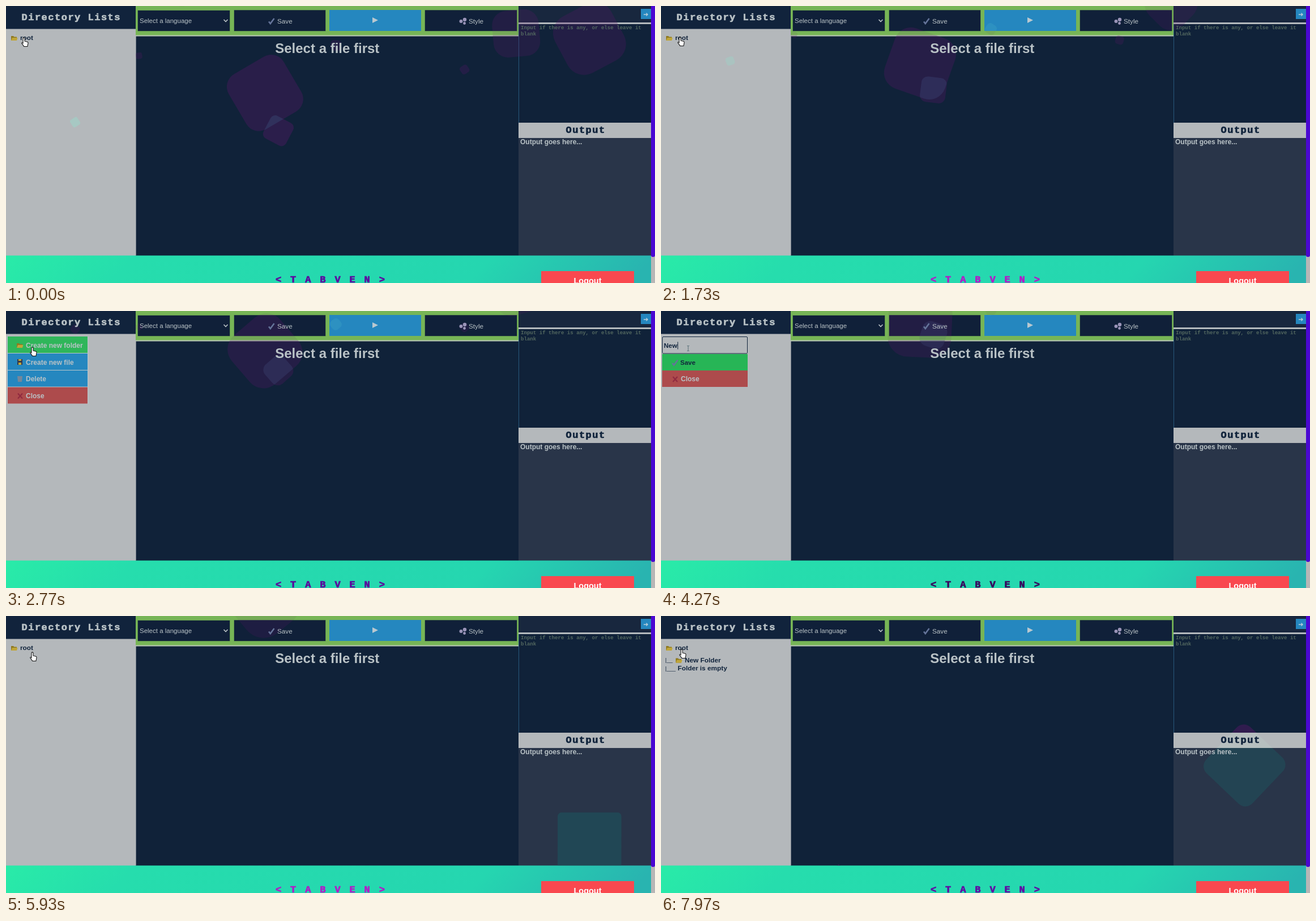
Write an HTML page with a canvas that moves like this. It is 1146 px wide and 489 px high and loops after 8000 ms.

```html
<!DOCTYPE html>
<html lang="en">
<head>
<meta charset="utf-8">
<title>Code editor</title>
<style>
html, body { margin: 0; width: 100%; height: 100%; overflow: hidden; background: #25dbb0; }
svg, canvas { position: absolute; left: 0; top: 0; width: 1146px; height: 489px; }
text { font-family: "Liberation Sans", Arial, sans-serif; font-size: 11.7px; fill: #b9c2c6; white-space: pre; }
.b { font-weight: bold; }
.menu text { font-weight: bold; font-size: 12px; }
.pixel { font: bold 17px "Liberation Mono", monospace; letter-spacing: 1.5px; color: #b9c2c6; fill: currentColor; stroke: currentColor; stroke-width: .7; }
.brand { letter-spacing: 15.9px; }
.mono { font: bold 9.1px "Liberation Mono", monospace; fill: #52675f; }
.dark { color: #11243c; fill: #11243c; }
.tree { font-weight: bold; font-size: 11.8px; fill: #11243c; }
.branch { font-size: 9.5px; fill: #11243c; }
</style>
</head>
<body>

<svg viewBox="0 0 1146 489">
  <defs>
    <linearGradient id="sea" x2="1" y2=".04">
      <stop offset="0" stop-color="#29eba8"/>
      <stop offset=".2" stop-color="#26ddad"/>
      <stop offset=".75" stop-color="#25d6b0"/>
      <stop offset="1" stop-color="#29b4b0"/>
    </linearGradient>
  </defs>
  <rect y="440" width="1146" height="49" fill="url(#sea)"/>
  <rect x="229" width="676" height="440.5" fill="#102239"/>
  <rect width="229.6" height="440.5" fill="#b4b8bb"/>
  <rect width="229" height="40.5" fill="#11233c"/>
  <rect x="229" width="676" height="52" fill="#77b556"/>
  <rect x="229" y="51.5" width="676" height="2" fill="#b9c8b4"/>
  <g fill="#102039" stroke="#102039" stroke-opacity=".45">
    <rect x="233" y="8" width="162" height="36"/>
    <rect x="403" y="7.5" width="161" height="36.5"/>
    <rect x="740" y="7.5" width="162" height="36.5"/>
  </g>
  <rect x="571" y="7" width="162" height="37" fill="#2587bf"/>
  <rect x="905" width="234" height="30" fill="#18273e"/>
  <rect x="905" y="32" width="234" height="174" fill="#102239"/>
  <path d="M905.5 32V206" stroke="#28587c"/>
  <rect x="905" y="29" width="234" height="3" fill="#b4babd"/>
  <rect x="1121" y="5" width="18" height="18" fill="#2587bf"/>
  <rect x="905" y="206" width="234" height="27" fill="#b4b8bb"/>
  <rect x="905" y="233" width="234" height="207.5" fill="#293549"/>
  <rect x="1139" width="7" height="489" fill="#b7b6b6"/>
  <rect x="1139" y="-5" width="7" height="448" rx="3" fill="#4a08d2"/>
</svg>

<canvas id="float" width="1146" height="489"></canvas>

<svg viewBox="0 0 1146 489">
  <defs>
    <g id="folder">
      <path d="M0 2h4l1.5 1.5H10V10H0z" fill="#8f7a20"/>
      <path d="M2 5h9.5L10 10H0z" fill="#c0a63a"/>
    </g>
    <path id="check" d="M1 6.5 3.8 10 10.5 1" fill="none" stroke="#65749a" stroke-width="2.6"/>
    <path id="cross" d="M1 1 9 10M9 1 1 10" stroke="#902a40" stroke-width="2"/>
    <clipPath id="reveal"><rect id="revealBox" y="69" width="229" height="0"/></clipPath>
  </defs>

  <text class="pixel" x="27.5" y="24.5">Directory Lists</text>
  <text x="236" y="29.5" style="font-size:11.5px">Select a language</text>
  <path d="M384.5 24l3.5 3.5 3.5-3.5" fill="none" stroke="#b9c2c6" stroke-width="1.6"/>
  <use href="#check" x="463" y="21"/>
  <text x="479" y="30.5">Save</text>
  <path d="M647 20l10 5-10 5z" fill="#b9c8d0"/>
  <g fill="#9a94b8">
    <circle cx="810" cy="24" r="3.2"/><circle cx="803.5" cy="27" r="3"/><circle cx="809.5" cy="30.5" r="2.4"/>
  </g>
  <text x="817" y="30.5">Style</text>
  <text class="b" x="567.3" y="83" text-anchor="middle" style="font-size:24px">Select a file first</text>
  <path d="M1126 15h7m-2.5-2.5 2.5 2.5-2.5 2.5" fill="none" stroke="#b9d0dc" stroke-width="1.4"/>
  <text class="mono" x="909" y="41">Input if there is any, or else leave it</text>
  <text class="mono" x="909" y="52">blank</text>
  <text class="pixel dark" x="988.5" y="224">Output</text>
  <text class="b" x="908" y="244" style="font-size:12px">Output goes here...</text>
  <text class="pixel brand" id="brand" x="476" y="487.5">&lt;TABVEN&gt;</text>
  <rect x="945" y="468" width="164" height="21" fill="#f9484f"/>
  <text class="b" x="1027" y="490" text-anchor="middle" style="font-size:14.5px;fill:#fff">Logout</text>

  <g id="root">
    <use href="#folder" x="9" y="51"/>
    <text class="tree" x="25" y="60">root</text>
  </g>
  <g clip-path="url(#reveal)">
    <text class="branch" x="7.5" y="81">|__</text>
    <use href="#folder" x="26" y="72.5"/>
    <text class="tree" x="42" y="81.5">New Folder</text>
    <text class="branch" x="7.5" y="95.5">|___</text>
    <text class="tree" x="29.5" y="96">Folder is empty</text>
  </g>

  <g id="menu" class="menu">
    <rect x="2" y="45" width="143" height="119" fill="#b9c8cc"/>
    <rect id="firstItem" x="3" y="45" width="141" height="29" fill="#2fb65a"/>
    <path d="M3 75h141v29H3zM3 105h141v28.5H3z" fill="#2587bf"/>
    <rect x="3" y="134.5" width="141" height="29" fill="#ad4b4c"/>
    <use href="#folder" x="19" y="55"/>
    <path d="M20 85h9v10h-9z" fill="#34394d"/>
    <path d="M22 85h5v3h-5zM22 91h5v4h-5z" fill="#c0a63a"/>
    <path d="M20 115h9l-1 10h-7z" fill="#75879a"/>
    <use href="#cross" x="20" y="144.5"/>
    <text x="35" y="64.5">Create new folder</text>
    <text x="35" y="94.5">Create new file</text>
    <text x="35" y="124">Delete</text>
    <text x="35" y="154">Close</text>
  </g>

  <g id="form" class="menu">
    <rect x="2.5" y="45.5" width="150" height="29.5" rx="1.5" fill="#b4b8bb" stroke="#11243c"/>
    <rect x="2" y="76" width="151" height="29" fill="#27b556"/>
    <rect x="2" y="105" width="151" height="29" fill="#ad4b4c"/>
    <use href="#check" x="19" y="85.5"/>
    <use href="#cross" x="20" y="115"/>
    <text class="dark" id="typed" x="5" y="65" style="font-size:11.5px"></text>
    <rect id="caret" y="54.5" width="1" height="13" fill="#11243c"/>
    <text class="dark" x="34" y="94.5" style="font-size:11.5px">Save</text>
    <text x="35" y="124">Close</text>
  </g>

  <g id="hand">
    <path transform="translate(.5 .5) scale(1.15)" d="M-3-6q0-1.5 1.3-1.5T-.4-6v4l4 1q1.5.5 1.2 2l-1 5h-5.3L-5 1.200q0-1.700 1.500-.700l.5.5z" fill="#fff" stroke="#111" stroke-width=".9"/>
  </g>
  <path id="beam" d="M46 61.5h1.5l.5.5.5-.5H50M48 62v8M46 70.5h1.5l.5-.5.5.5H50" fill="none" stroke="#4c6870" stroke-width=".9"/>
</svg>

<script>
const LOOP = 8000;
const $ = id => document.getElementById(id);
const ctx = $("float").getContext("2d");

// Floating squares: left (share of width), size, duration and delay in seconds
const STAGE_W = 1146, FLOOR = 440.5, ZOOM = 0.75, CLOCK = 1843.445;
const squares = [
  [.25, 80, 25, 0], [.10, 20, 12, 2], [.70, 20, 25, 4], [.40, 60, 18, 0], [.65, 20, 25, 0],
  [.75, 110, 25, 3], [.35, 150, 25, 7], [.50, 25, 45, 15], [.20, 15, 35, 2], [.85, 150, 11, 0]
];
const SMALL = 3, BIG = 6;

// Tint of the squares over each kind of panel: colour, strength, areas
const sidebar = [0, 41, 229, 400], play = [571, 7, 162, 37];
const outputHead = [905, 206, 234, 27], output = [905, 233, 234, 207.5];
const bar = [229, 0, 676, 52];
const buttons = [[233, 8, 162, 36], [403, 7, 161, 37], play, [740, 7, 162, 37]];
const tints = [
  ["150,222,205", .75, [sidebar]],
  ["80,190,205", .6, [play]],
  ["185,205,200", .5, [outputHead]],
  ["26,96,102", .52, [output]],
  ["90,24,105", .65, null]
];

function squarePath([left, size, dur, delay], sec) {
  const p = ((CLOCK + sec - delay) / dur) % 1;
  const s = size * ZOOM;
  const x = left * STAGE_W + s / 2;
  const y = FLOOR + 150 * ZOOM - s / 2 - 1000 * ZOOM * p;
  const m = new DOMMatrix().translate(x, y).rotate(720 * p);
  const box = new Path2D(), path = new Path2D();
  box.roundRect(-s / 2, -s / 2, s, s, s * p / 2);
  path.addPath(box, m);
  return { path, fade: 1 - p };
}

// Without areas, everything but the specially tinted panels
function clipTo(areas) {
  const region = new Path2D();
  if (areas) areas.forEach(a => region.rect(...a));
  else {
    region.rect(0, 0, STAGE_W, FLOOR);
    [sidebar, play, outputHead, output].forEach(a => region.rect(...a));
  }
  ctx.clip(region, "evenodd");
}

function drawSquares(sec) {
  const shapes = squares.map(q => squarePath(q, sec));
  ctx.clearRect(0, 0, STAGE_W, 489);
  for (const [rgb, strength, areas] of tints) {
    ctx.save();
    clipTo(areas);
    for (const { path, fade } of shapes) {
      ctx.fillStyle = `rgba(${rgb},${strength * fade})`;
      ctx.fill(path);
    }
    ctx.restore();
  }
  // the overlap of two squares turns teal
  ctx.save();
  ctx.clip(shapes[BIG].path);
  ctx.fillStyle = `rgba(36,76,100,${.8 * shapes[SMALL].fade})`;
  ctx.fill(shapes[SMALL].path);
  ctx.restore();
  // the green strip shows the squares only faintly
  ctx.save();
  clipTo([bar, ...buttons]);
  ctx.globalCompositeOperation = "destination-out";
  ctx.fillStyle = "rgba(0,0,0,.7)";
  ctx.fillRect(...bar);
  ctx.restore();
}

// Linear value between rows of [time, ...values]
function track(rows, t) {
  const i = rows.findIndex(r => r[0] > t);
  if (i < 0) return rows[rows.length - 1].slice(1);
  const a = rows[i - 1], b = rows[i], k = (t - a[0]) / (b[0] - a[0]);
  return a.slice(1).map((v, j) => v + (b[j + 1] - v) * k);
}

const pointer = [[0, 33, 64], [1500, 35, 63], [2150, 35, 63], [2600, 48, 72], [6100, 48, 72], [6700, 39, 65], [7030, 39, 65], [7500, 38, 67]];
const glow = [[0, 92, 10, 160], [1730, 176, 30, 200], [2770, 90, 10, 156], [4270, 56, 8, 94], [5930, 176, 30, 200], [7030, 152, 24, 182], [7970, 96, 12, 164]];
const keyTimes = [3850, 4000, 4150, 4400, 4550, 4680, 4800, 4920, 5040, 5160];
const folderName = "New Folder";

const MENU_AT = 2050, FORM_AT = 3150, DONE_AT = 5550, EXPAND_AT = 6970, EXPAND_MS = 350;
const show = (id, on) => { $(id).style.display = on ? "" : "none"; };

function render(t) {
  drawSquares(t / 1000);
  const menu = t >= MENU_AT && t < FORM_AT;
  const form = t >= FORM_AT && t < DONE_AT;
  show("menu", menu);
  show("form", form);
  show("root", !menu && !form);
  show("hand", !form);
  show("beam", form);

  const [x, y] = track(pointer, t);
  $("hand").setAttribute("transform", `translate(${x} ${y})`);
  $("brand").style.color = `rgb(${track(glow, t).map(Math.round)})`;

  if (form) {
    const typed = $("typed");
    const pressed = keyTimes.filter(k => k <= t);
    typed.textContent = folderName.slice(0, pressed.length);
    $("caret").setAttribute("x", 5.5 + typed.getComputedTextLength());
    show("caret", (t - (pressed.pop() || FORM_AT)) % 1000 < 500);
  }
  const open = Math.min(1, Math.max(0, (t - EXPAND_AT) / EXPAND_MS));
  $("revealBox").setAttribute("height", 31 * open);
}

const start = performance.now();
function tick() {
  render((performance.now() - start) % LOOP);
  requestAnimationFrame(tick);
}
render(0);
requestAnimationFrame(tick);
</script>
</body>
</html>
```
